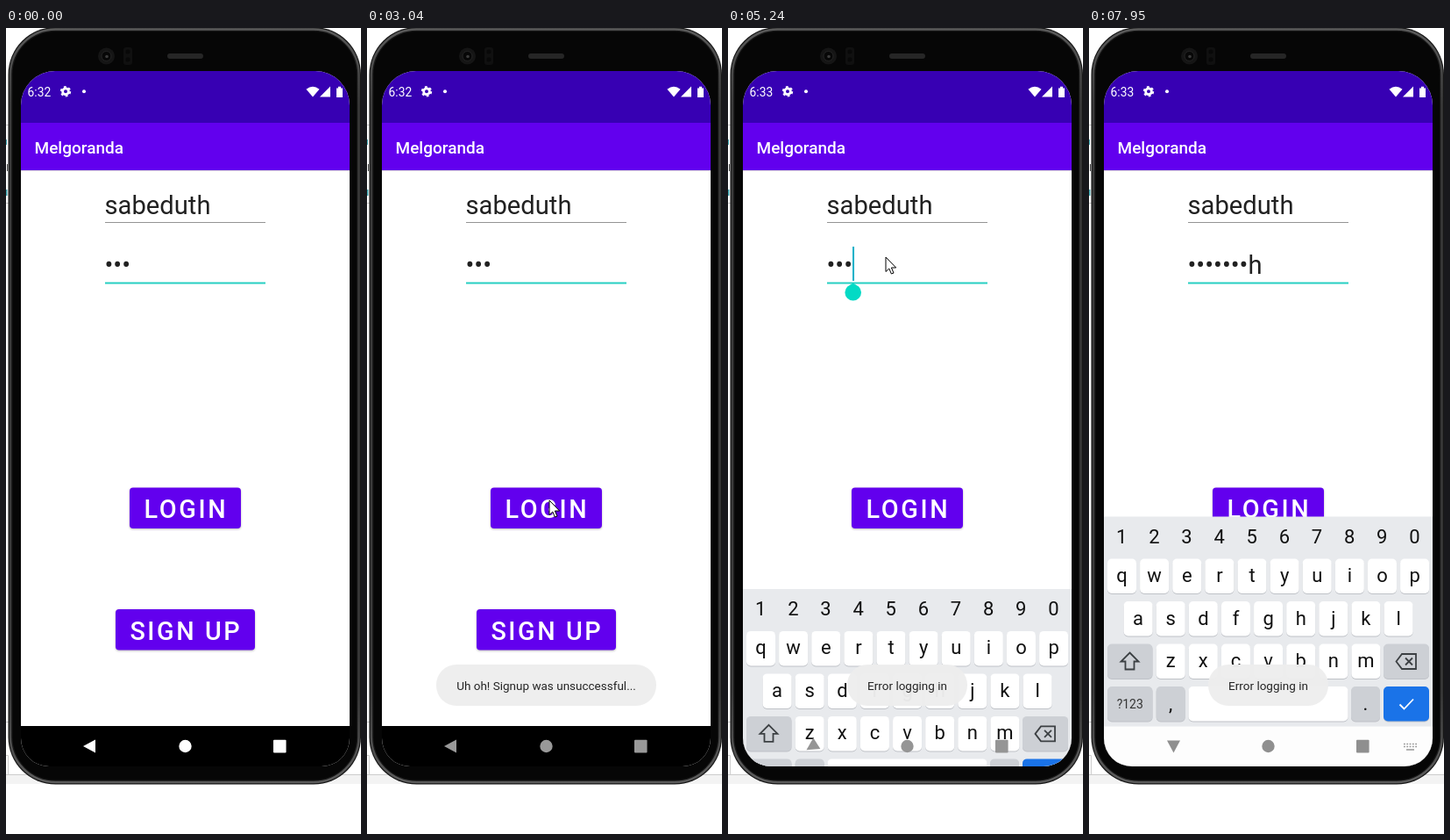
An HTML page for the animation above (8000 ms loop, 405x918 px).

```html
<!DOCTYPE html>
<html lang="en">
<head>
<meta charset="utf-8">
<title>Login screen</title>
<style>
html, body { margin: 0; width: 100%; height: 100%; overflow: hidden; background: #fff; }
svg { display: block; width: 100vw; height: 100vh; font-family: Roboto, sans-serif; }
.field { font-size: 29.2px; fill: #212121; }
.button text { font-size: 28.8px; font-weight: 500; letter-spacing: 2.57px; fill: #fff; }
.button .face { fill: #6200ee; filter: drop-shadow(0 1.5px 1px #0004); }
.press { fill: #fff; opacity: 0; }
.toast { text-anchor: middle; font-size: 13.5px; fill: #252525; }
.toast rect { fill: #eee; opacity: .97; }
#keys { text-anchor: middle; font-size: 22px; fill: #111; }
</style>
</head>
<body>
<svg viewBox="0 0 405 918">
  <defs>
    <clipPath id="screen">
      <path d="M17 88a39 39 0 0 1 39-39H353a39 39 0 0 1 39 39V809a32 32 0 0 1-32 32H49a32 32 0 0 1-32-32Z"/>
    </clipPath>
    <linearGradient id="rim" x2="0" y2="1">
      <stop stop-color="#5a5a5a"/><stop offset=".1" stop-color="#3a3a3a"/>
      <stop offset=".88" stop-color="#3a3a3a"/><stop offset="1" stop-color="#5c5c5c"/>
    </linearGradient>
  </defs>

  <!-- desktop behind the phone -->
  <path d="M0 851H405V861H0Z" fill="#f3f3f3"/>
  <path d="M0 850.5H405M0 828.5H2.5V851M0 790.5H3M0 110.5H3M0 199.5H3" fill="none" stroke="#ccc"/>
  <path d="M0 127h1v6H0ZM0 184h1.5v7H0Z" fill="#3ba3ad"/>
  <path d="M1 155h1v8H1Z" fill="#444"/>

  <!-- phone body -->
  <rect x="2.5" y="-1" width="402.5" height="862.5" rx="54" fill="#161616"/>
  <rect x="5" y="1.5" width="397.5" height="857.5" rx="51.5" fill="none" stroke="url(#rim)" stroke-width="2.5"/>
  <rect x="7.5" y="4" width="392.5" height="852.5" rx="49" fill="#060606"/>
  <circle cx="114.5" cy="32" r="9.5" fill="#151515"/>
  <circle cx="114.5" cy="32" r="5.5" fill="#070707" stroke="#242424"/>
  <circle cx="115" cy="32.5" r="1.8" fill="#3c3c3c"/>
  <rect x="134" y="22" width="10" height="20" rx="3" fill="#101010"/>
  <circle cx="139" cy="27" r="2.5" fill="#080808"/><circle cx="139" cy="36" r="2.5" fill="#080808"/>
  <rect x="184" y="29" width="41" height="6" rx="3" fill="#262626"/>

  <g clip-path="url(#screen)">
    <path d="M17 49H392V841H17Z" fill="#fff"/>
    <path d="M17 49H392V108H17Z" fill="#3700b3"/>
    <path d="M17 108H392V162H17Z" fill="#6200ee"/>
    <path d="M17 162.5H392" stroke="#000" stroke-opacity=".14"/>
    <path d="M17 795H392V841H17Z"/>

    <g fill="#fff">
      <text id="clock" x="24.6" y="77.8" font-size="13.8">6:32</text>
      <circle cx="68" cy="72.3" r="3.4" fill="none" stroke="#fff" stroke-width="2.8"/>
      <circle cx="68" cy="72.3" r="5.2" fill="none" stroke="#fff" stroke-width="2" stroke-dasharray="2.7 2.745"/>
      <circle cx="89" cy="72.3" r="2"/>
      <path d="M342.5 69.8Q350 63.5 357.5 69.8L350 78.5Z"/>
      <path d="M370 66.5V78.5H358Z"/>
      <path d="M377 68.5h2v-1.7h3v1.7h2V79h-7Z"/>
      <text x="32.5" y="143" font-size="19" font-weight="500">Melgoranda</text>
    </g>

    <text class="field" x="112.5" y="212">sabeduth</text>
    <path d="M113 221.5H296" stroke="#949494"/>
    <text class="field" id="password" x="112.5" y="280" xml:space="preserve">•••</text>
    <path d="M113 290.5H296" stroke="#26cfc2" stroke-width="2"/>
    <rect id="caret" y="249" width="2" height="39"/>
    <path id="handle" d="M142.7 290.5l6.4 4a9.3 9.3 0 1 1-12.8 0Z" fill="#03dac5"/>

    <g class="button">
      <rect class="face" x="141" y="523.5" width="127" height="46.5" rx="4"/>
      <rect class="press" id="pressLogin" x="141" y="523.5" width="127" height="46.5" rx="4"/>
      <text x="157.6" y="558">LOGIN</text>
    </g>
    <g class="button">
      <rect class="face" x="125" y="662" width="159" height="46.5" rx="4"/>
      <rect class="press" id="pressSignup" x="125" y="662" width="159" height="46.5" rx="4"/>
      <text x="141.4" y="696.5">SIGN UP</text>
    </g>

    <g id="keyboard">
      <path d="M17 556.5H392V796H17Z" fill="#e8eaed"/>
      <path d="M17 795.5H392V846H17Z" fill="#fdfdfd"/>
      <g id="keys"></g>
      <g fill="none" stroke="#3c4043" stroke-width="1.8">
        <path d="M46.5 711.5L56.5 721.5H51.5V730.5H41.5V721.5H36.5Z"/>
        <path d="M350.5 721.5L357 713H373V730H357ZM361 717.5L369 725.5M369 717.5L361 725.5"/>
        <path d="M354.5 770.5L359.5 775.5L370 764.5" stroke="#fff"/>
      </g>
      <path d="M359 815.5H374M359 818.5H374" stroke="#999" stroke-width="1.6" stroke-dasharray="1.8 1.5"/>
      <path d="M362 822H371" stroke="#999" stroke-width="1.4"/>
    </g>

    <g id="nav">
      <path id="back" d="M88 818L102 810.5V825.5Z"/>
      <circle cx="204.5" cy="818" r="7.2"/>
      <rect x="305" y="810.8" width="14.6" height="14.6" rx="1"/>
    </g>

    <g class="toast" id="toastSignup">
      <rect x="79" y="725" width="251" height="47" rx="23"/>
      <text x="204.5" y="753.8">Uh oh! Signup was unsuccessful...</text>
    </g>
    <g class="toast" id="toastLogin">
      <rect x="136" y="725" width="137" height="47" rx="23"/>
      <text x="204.5" y="753.8">Error logging in</text>
    </g>
  </g>

  <path id="pointer" d="M0 0V16.5L3.8 13L6.4 19L9 18L6.4 12H11.7Z" fill="#fff" stroke="#000" stroke-linejoin="round"/>
</svg>
<script>
const $ = id => document.getElementById(id);
const LOOP = 8000, TAP = 4920, PASSWORD = "sabeduth";
const KEY_TIMES = [6330, 6480, 6600, 6800, 7010, 7140, 7340, 7410];

// pointer stops: time, x, y
const PATH = [
  [200, 358, 902], [950, 212, 703], [1250, 206, 692], [1800, 206, 692],
  [2280, 199, 583], [2380, 199, 583], [2640, 207, 545], [3000, 208, 538],
  [3800, 208, 538], [4540, 167, 269], [4640, 167, 269], [4770, 174, 234],
  [4900, 180, 261], [LOOP, 180, 261]
];

const ramp = (t, from, to) => Math.min(1, Math.max(0, (t - from) / (to - from)));
const show = (id, on) => $(id).setAttribute("visibility", on ? "visible" : "hidden");
const pulse = (t, from, to) => 0.16 * Math.sin(Math.PI * ramp(t, from, to));

function buildKeys() {
  let out = "";
  const label = (s, x, y, extra = "") => out += `<text x="${x}" y="${y}" ${extra}>${s}</text>`;
  const key = (x, y, w, fill, s = "", extra) => {
    out += `<rect x="${x}" y="${y + 1}" width="${w}" height="39.5" rx="5" fill="#bfc2c7"/>` +
           `<rect x="${x}" y="${y}" width="${w}" height="39.5" rx="5" fill="${fill}"/>`;
    if (s) label(s, x + w / 2, y + 26.5, extra);
  };
  const row = (chars, x, y) => [...chars].forEach((c, i) => key(x + 37.12 * i, y, 33, "#fff", c));
  const grey = "#cdd0d5";
  [..."1234567890"].forEach((c, i) => label(c, 37.3 + 37.12 * i, 587));
  row("qwertyuiop", 21, 604.5);
  row("asdfghjkl", 39.6, 653);
  row("zxcvbnm", 76.7, 701.5);
  key(21, 701.5, 51.5, grey);
  key(336, 701.5, 52, grey);
  key(21, 750, 51.5, grey, "?123", 'font-size="14" dy="-1.5" fill="#333"');
  key(76.7, 750, 33, grey, ",");
  key(113.5, 750, 182, "#fff");
  key(299, 750, 33, grey, ".");
  key(336, 750, 52, "#1a73e8");
  $("keys").innerHTML = out;
}

function pointerAt(t) {
  let i = 1;
  while (i < PATH.length - 1 && PATH[i][0] <= t) i++;
  const [t0, x0, y0] = PATH[i - 1], [t1, x1, y1] = PATH[i];
  const p = ramp(t, t0, t1), e = p * p * (3 - 2 * p);
  return [x0 + (x1 - x0) * e, y0 + (y1 - y0) * e];
}

function drawPassword(t) {
  const typed = KEY_TIMES.filter(k => k <= t).length;
  $("password").textContent = typed ? "•".repeat(typed - 1) + PASSWORD[typed - 1] : "•••";
  // the blink restarts with every tap and key press
  const since = typed ? KEY_TIMES[typed - 1] : t >= TAP ? TAP : -810;
  show("caret", (t - since) % 1000 < 500);
  $("caret").setAttribute("x", 112.5 + $("password").getComputedTextLength());
  $("caret").setAttribute("fill", t >= TAP && !typed ? "#12b0c8" : "#1ccabb");
  show("handle", t >= TAP && !typed);
  show("pointer", t >= 200 && !typed);
}

function drawNav(t) {
  const rise = ramp(t, 5130, 5440);
  show("keyboard", rise > 0);
  $("keyboard").setAttribute("transform", `translate(0 ${285 * (1 - rise) ** 2.8})`);
  $("back").setAttribute("transform", `rotate(${-90 * rise} 96 817.5)`);
  const grey = 255 - 102 * ramp(t, 900, 2380) - 10 * rise;
  $("nav").setAttribute("fill", `rgb(${grey},${grey},${grey})`);
}

function draw() {
  const t = performance.now() % LOOP;
  $("clock").textContent = t < 3300 ? "6:32" : "6:33";
  $("pointer").setAttribute("transform", `translate(${pointerAt(t)})`);
  $("pressSignup").style.opacity = pulse(t, 1380, 1680);
  $("pressLogin").style.opacity = pulse(t, 2720, 3020);
  $("toastSignup").style.opacity = ramp(t, 1750, 1950) - ramp(t, 3800, 4000);
  $("toastLogin").style.opacity = ramp(t, 4100, 4300);
  drawPassword(t);
  drawNav(t);
  requestAnimationFrame(draw);
}

buildKeys();
draw();
</script>
</body>
</html>
```
